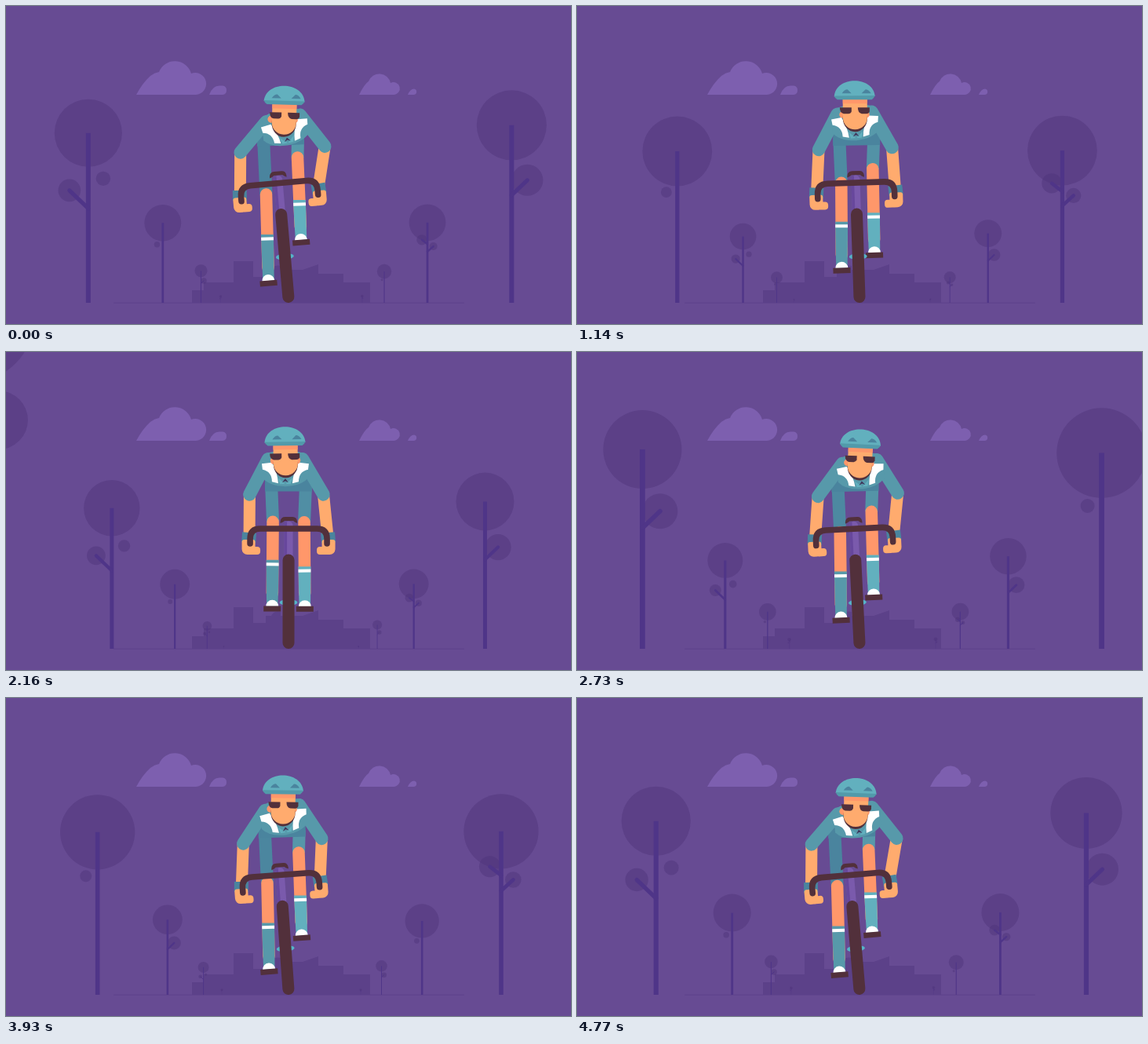
An HTML page with a canvas for the animation above (4.8 s loop, 720 px wide and 405 px high).

```html
<!DOCTYPE html>
<html lang="en">
<head>
<meta charset="utf-8">
<title>Cyclist</title>
<style>
  html, body { margin: 0; width: 100%; height: 100%; overflow: hidden; background: #674b93; }
  canvas { display: block; }
</style>
</head>
<body>
<canvas id="stage" width="720" height="405"></canvas>
<script>
const ctx = document.getElementById('stage').getContext('2d');
const LOOP = 4800, BEAT = 960, TAU = Math.PI * 2;
const C = {
  sky: '#674b93', cloud: '#7d5faf', city: '#5c4189', crown: 'rgba(78,51,121,.45)', trunk: '#4f3588',
  light: '#62b0be', teal: '#5799aa', deep: '#4a849e', dark: '#52303b', white: '#fff',
  skin: '#ffab6e', leg: '#ff976a', tube: '#7a5aac', shade: '#67479c', crank: '#55b3c8'
};

// ---- drawing helpers ----
function fill(d, color) {
  ctx.fillStyle = color;
  ctx.fill(new Path2D(d));
}
function disc(x, y, r, color) {
  ctx.fillStyle = color;
  ctx.beginPath();
  ctx.arc(x, y, r, 0, TAU);
  ctx.fill();
}
function line(a, b, w, color, cap = 'butt') {
  ctx.strokeStyle = color;
  ctx.lineWidth = w;
  ctx.lineCap = cap;
  ctx.beginPath();
  ctx.moveTo(a[0], a[1]);
  ctx.lineTo(b[0], b[1]);
  ctx.stroke();
}
function poly(points, color) {
  fill('M' + points.map(p => p.join(' ')).join('L') + 'Z', color);
}
function at(x, y, angle, draw) {
  ctx.save();
  ctx.translate(x, y);
  ctx.rotate(angle);
  draw();
  ctx.restore();
}
function turn([x, y], [ox, oy], a) {
  const c = Math.cos(a), s = Math.sin(a);
  return [ox + x * c - y * s, oy + x * s + y * c];
}
const mix = (a, b, k) => a + (b - a) * k;
const lerp = (p, q, k) => [mix(p[0], q[0], k), mix(p[1], q[1], k)];
const flip = (side, [x, y]) => [side < 0 ? x : 720 - x, y];

// ---- scenery ----
function backdrop() {
  ctx.fillStyle = C.sky;
  ctx.fillRect(0, 0, 720, 405);
  fill('M166 113 Q174 98 184 89 Q189 85 195 84 A21.7 21.7 0 0 1 236 86 A14 14 0 1 1 242 113 Z', C.cloud);
  fill('M259 113 Q263 101.5 272 101.5 H276 A5.8 5.8 0 0 1 276 113 Z', C.cloud);
  fill('M450 113 Q457 99 462 96 A14.6 14.6 0 0 1 490 98 A8 8 0 1 1 494 113 Z', C.cloud);
  fill('M512 113 Q515 105.5 520 105.5 A3.8 3.8 0 0 1 520 113 Z', C.cloud);
  ctx.fillStyle = C.city;
  ctx.fillRect(137, 377.6, 447, 0.9);
  fill('M237 378 V362 H252 V352 H290 V325 H315 V345 H331 V336 H338 Q342 329 350 331 V336 ' +
       'H378 L398 329 V341 H430 V352 H464 V378 Z', C.city);
}

// Tree kinds at unit scale; puffs are [dx, height, radius, branch root height].
const KINDS = {
  P: { h: 222, r: 51, puffs: [[-16, 162, 8, 0]] },
  Q: { h: 216, r: 43, puffs: [[-24, 143, 14.3, 120], [19, 158, 9.2, 0]] },
  R: { h: 226, r: 44.5, puffs: [[20, 156, 20, 137]] },
  S: { h: 223, r: 51, puffs: [[-15.5, 175, 14.5, 163], [16.5, 157, 11, 142]] }
};
const LEFT = 'PQRPQ', RIGHT = 'SRPSR';

function tree(kind, x, s) {
  const { h, r, puffs } = KINDS[kind], ground = 378, w = 6 * s;
  disc(x, ground - h * s, r * s, C.crown);
  for (const [dx, py, pr] of puffs) disc(x + dx * s, ground - py * s, pr * s, C.crown);
  line([x, ground], [x, ground - h * s], w, C.trunk);
  for (const [dx, py, , root] of puffs) {
    if (root) line([x, ground - root * s], [x + dx * s, ground - py * s], w * 0.85, C.trunk, 'round');
  }
}

// Trees enter beside the camera and recede with a decaying speed.
function trees(t) {
  const row = [0, 1, 2, 3, 4].map(k => ({ k, age: (t - k * BEAT + LOOP) % LOOP }));
  row.sort((a, b) => b.age - a.age);
  for (const { k, age } of row) {
    const early = Math.max(0, (690 - age) / 180);
    const off = 60.3 + 195 * Math.exp((BEAT - age) / 1437) + 4 * early * early;
    const s = (off - 80) / 175;
    if (s <= 0.01) continue;
    tree(LEFT[k], 360 - off, s);
    tree(RIGHT[k], 356 + off * 1.13, s);
  }
}

// ---- rider ----
function leg(side, p, lean) {
  const c = Math.cos(p);
  const foot = flip(side, [339.2 - 4.6 * c, 327 + 26 * c]);
  const knee = flip(side, [340 - 8.5 * c, 216.5 + 23.5 * c]);
  const hip = flip(side, [338 - 10 * c, 168]);
  const k = (1 - c) / 2;
  const shorts = `rgb(${mix(74, 87, k)},${mix(132, 153, k)},${mix(158, 170, k)})`;
  const sock = side < 0 ? C.teal : C.light, len = side < 0 ? 62 : 54;
  const up = d => lerp(foot, knee, d / (foot[1] - knee[1]));
  line(hip, knee, 16, shorts);
  line(up(20), knee, 15.5, C.leg, 'round');
  const [x1, y1] = up(len), [x2, y2] = up(2);
  poly([[x1 - 8, y1], [x1 + 8, y1], [x2 + 7.2, y2], [x2 - 7.2, y2]], sock);
  line(up(len - 3.5), up(len - 7.5), 15.8, C.white);
  at(foot[0], foot[1], lean, () => {
    fill('M-8 -3 A8 8 0 0 1 8 -3 Z', C.white);
    ctx.fillStyle = C.dark;
    ctx.fillRect(-11, -3.4, 22, 7);
  });
}

function elbow(side, p) {
  const c = Math.cos(p), s = Math.sin(p), c2 = Math.cos(2 * p), s2 = Math.sin(2 * p);
  return flip(side, [309.6 - 7.5 * c - 2.6 * s - 3.4 * c2 + 1.75 * s2, 182 + 3.9 * c + 0.6 * c2]);
}

// Bike parts are placed around the tyre's contact point.
function bike() {
  fill('M-10.5 -154 V-156 Q-10 -162 -4 -162 H5 Q10.5 -162 11 -156 V-154 Q8 -155 6 -157 H-5 Q-7 -155 -10.5 -154 Z', C.dark);
  fill('M-5.5 -105 V-151 A5.5 5.5 0 0 1 5.5 -151 V-105 Z', C.tube);
  fill('M-5.5 -105 V-151 A5.5 5.5 0 0 1 -2 -156 V-105 Z', C.shade);
  ctx.fillStyle = C.crank;
  ctx.beginPath();
  ctx.ellipse(0, -53, 11.5, 4, 0, 0, TAU);
  ctx.fill();
  line([0, -107], [0, -1.5], 15, C.dark, 'round');
}

function grips() {
  for (const side of [1, -1]) {
    ctx.save();
    ctx.scale(side, 1);
    line([-50, -142], [-51, -129], 18, C.deep);
    ctx.fillStyle = C.skin;
    ctx.beginPath();
    ctx.roundRect(-59.5, -133, 17, 19, [3, 3, 6, 7]);
    ctx.roundRect(-50, -124, 14, 10, 4);
    ctx.fill();
    ctx.restore();
  }
  ctx.strokeStyle = C.dark;
  ctx.lineWidth = 7.6;
  ctx.lineCap = 'round';
  ctx.stroke(new Path2D('M-49 -128 V-134 Q-49 -147 -36 -147 H36 Q49 -147 49 -134 V-128'));
}

function jersey() {
  fill('M-27 -20 Q0 -30 27 -20 L30 9 Q22 20 0 21 Q-22 20 -30 9 Z', C.teal);
  for (const side of [1, -1]) {
    ctx.save();
    ctx.scale(side, 1);
    fill('M-30 -8 L-17 -9.5 Q-10 3 -9 17 L-17 15 Q-17 2 -29 -0.5 Z', C.white);
    ctx.restore();
  }
  fill('M-9 10 L0 18 L9 10 L7 18 H-7 Z', C.light);
  fill('M-4 16 L0 11 L4 16 L0 14 Z', '#3f3258');
}

function head(shift) {
  disc(-14.5 - shift, 43, 4.5, C.leg);
  disc(15 - shift, 43, 4.5, C.leg);
  fill('M-15 45 H16 V48 A15.5 17 0 0 1 -15 48 Z', C.dark);
  fill('M-15 21 H16 V47 A15.5 15 0 0 1 -15 47 Z', C.skin);
  ctx.fillStyle = C.leg;
  ctx.fillRect(-15, 21, 31, 8);
  for (const x of [-19.5, 3.5]) {
    at(x + shift, 34, 0, () => fill('M0 0 H15 V5 Q14 8 11 8 H5 Q0 7 0 0 Z', C.dark));
  }
  fill('M-26 20 C-24 -6.6 24 -6.6 26 20 Z', C.light);
  fill('M-26 19 H26 Q25 22 22 24 H-22 Q-25 22 -26 19 Z', '#529aaa');
  fill('M-16 16 Q-13 11 -9 11 L-4 16 Z M9 16 L14 11 Q18 11 21 16 Z', C.deep);
}

function rider(t) {
  const th = TAU * t / BEAT, opp = th + Math.PI;
  const sway = -Math.cos(th), lean = sway * 5 * Math.PI / 180;
  const hx = 360.5 - 7.5 * Math.cos(th - Math.PI / 4);
  const hy = 98.5 + 3.5 * Math.cos(2 * th + Math.PI / 8);
  const chest = [360 + 0.85 * (hx - 360), hy + 55], twist = sway * 11 * Math.PI / 180;
  const base = [360, 372], sides = [[-1, th], [1, opp]];

  for (const [side, p] of sides) leg(side, p, lean);
  at(...base, lean, bike);
  for (const [side, p] of sides) {
    line(elbow(side, p), turn([side * 50, -136], base, lean), 15, C.skin, 'round');
  }
  at(...base, lean, grips);

  const hips = 360 + 10 * sway;
  poly([[hips - 30, 155], [hips + 30, 155], [hips + 30, 177.5 + 1.2 * sway], [hips - 30, 177.5 - 1.2 * sway]], C.deep);
  for (const [side, p] of sides) {
    line(turn([side * 22, -14], chest, twist), elbow(side, p), 16.5, C.teal, 'round');
  }
  at(...chest, twist, jersey);
  const tilt = 0.8 + 1.8 * Math.cos(th - TAU * 5 / 6);
  at(hx, hy, tilt * Math.PI / 180, () => head(-1.5 * sway));
}

function frame(now) {
  const t = now % LOOP;
  backdrop();
  trees(t);
  rider(t);
}

const start = performance.now();
function tick() {
  frame(performance.now() - start);
  requestAnimationFrame(tick);
}
tick();
</script>
</body>
</html>
```
